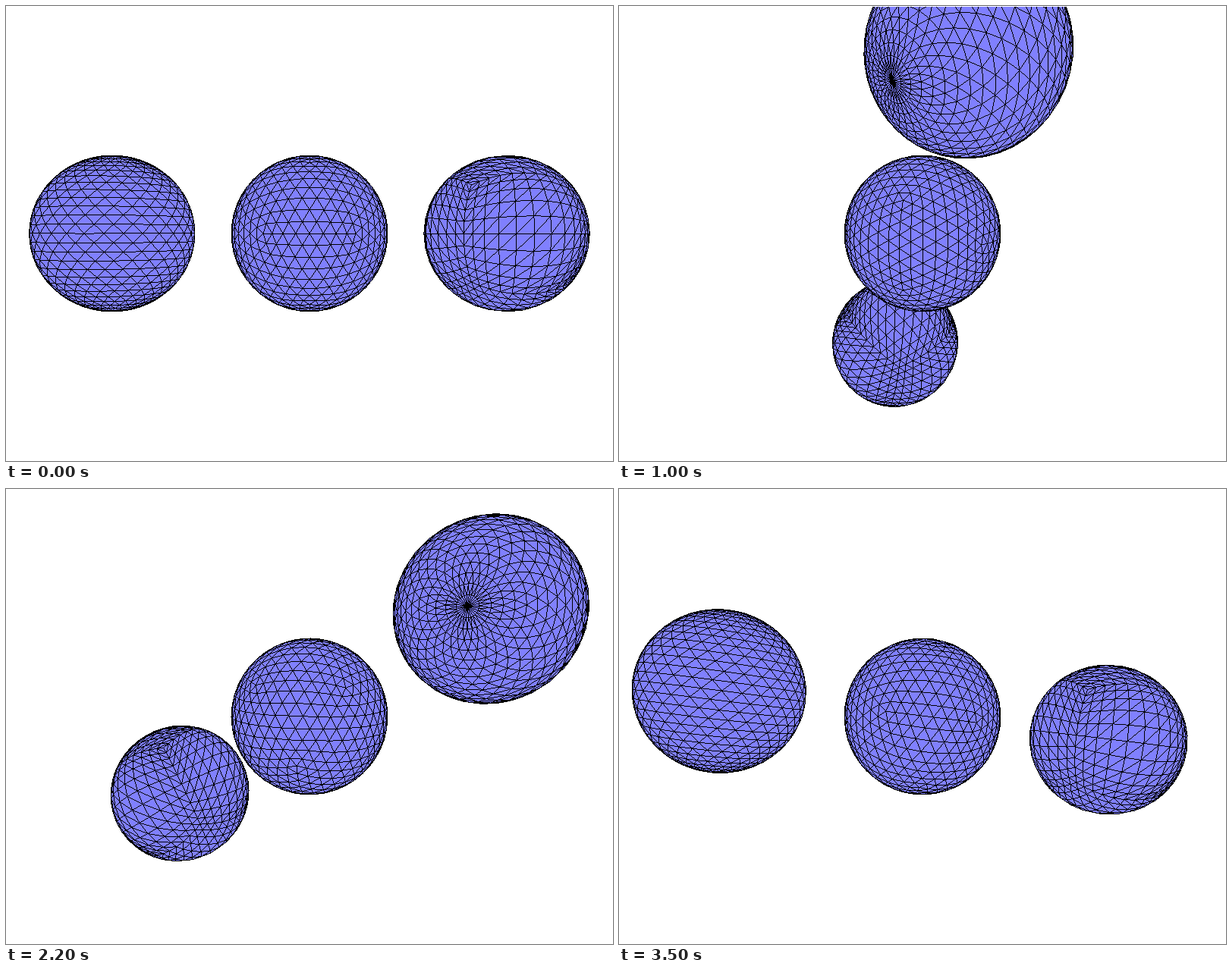
Write an HTML page with a canvas that moves like this. It is 800 by 600 pixels and loops after 3.6 s.

```html
<!DOCTYPE html>
<html lang="en">
<head>
<meta charset="utf-8">
<title>Three sphere meshes</title>
<style>
  html, body { margin: 0; width: 100%; height: 100%; overflow: hidden; background: #fff; }
  canvas { display: block; width: 800px; height: 600px; }
</style>
</head>
<body>
<canvas id="stage" width="800" height="600"></canvas>
<script>
const W = 800, H = 600;
const FOCAL = 300 / Math.tan(Math.PI / 8);
const DISTANCE = 7.1, SPACING = 2.5;
const STEP_MS = 100, STEPS = 36;
const RIM = -0.1; // edges of faces turned away this little still show
const WHITE = 0xffffffff, BLACK = 0xff000000, BLUE = 0xffff8080;

const ctx = document.getElementById('stage').getContext('2d');
const image = ctx.createImageData(W, H);
const pixels = new Uint32Array(image.data.buffer);

const sub = (a, b) => a.map((v, i) => v - b[i]);
const dot = (a, b) => a[0] * b[0] + a[1] * b[1] + a[2] * b[2];
const cross = (a, b) => [
  a[1] * b[2] - a[2] * b[1],
  a[2] * b[0] - a[0] * b[2],
  a[0] * b[1] - a[1] * b[0]
];
const unit = p => {
  const len = Math.hypot(...p);
  return p.map(v => v / len);
};

// Rings of equal latitude, every other one turned by half a segment
function ringSphere(rings, segments) {
  const tris = [];
  const at = (i, j) => {
    const lat = Math.PI * i / rings;
    const lon = 2 * Math.PI * (j + (i % 2) / 2) / segments;
    const r = Math.sin(lat);
    return [r * Math.cos(lon), Math.cos(lat), r * Math.sin(lon)];
  };
  for (let i = 0; i < rings; i++) {
    const odd = i % 2;
    for (let j = 0; j < segments; j++) {
      if (i > 0) tris.push([at(i, j), at(i, j + 1), at(i + 1, j + odd)]);
      if (i < rings - 1) tris.push([at(i + 1, j), at(i + 1, j + 1), at(i, j + 1 - odd)]);
    }
  }
  return tris;
}

// Flat triangular grid of n rows, pushed out to the sphere
function splitFace(a, b, c, n) {
  const tris = [];
  const at = (i, j) => unit(a.map((v, k) => v * (n - i - j) + b[k] * i + c[k] * j));
  for (let i = 0; i < n; i++) {
    for (let j = 0; j < n - i; j++) {
      tris.push([at(i, j), at(i + 1, j), at(i, j + 1)]);
      if (i + j < n - 1) tris.push([at(i + 1, j), at(i + 1, j + 1), at(i, j + 1)]);
    }
  }
  return tris;
}

function icoSphere(n) {
  const g = (1 + Math.sqrt(5)) / 2;
  const corners = [];
  for (const s of [-1, 1]) {
    for (const t of [-g, g]) corners.push([s, 0, t], [t, s, 0], [0, t, s]);
  }
  const near = (a, b) => Math.hypot(...sub(a, b)) < 2.1;
  const tris = [];
  for (let i = 0; i < 12; i++) {
    for (let j = 0; j < i; j++) {
      for (let k = 0; k < j; k++) {
        const [a, b, c] = [corners[i], corners[j], corners[k]];
        if (near(a, b) && near(b, c) && near(a, c)) tris.push(...splitFace(a, b, c, n));
      }
    }
  }
  return tris;
}

function cubeSphere(n) {
  const tris = [];
  for (let axis = 0; axis < 3; axis++) {
    for (const side of [-1, 1]) {
      const at = (i, j) => {
        const p = [0, 0, 0];
        p[axis] = side;
        p[(axis + 1) % 3] = 2 * i / n - 1;
        p[(axis + 2) % 3] = side * (2 * j / n - 1);
        return unit(p);
      };
      for (let i = 0; i < n; i++) {
        for (let j = 0; j < n; j++) {
          const a = at(i, j), c = at(i + 1, j + 1);
          tris.push([a, at(i + 1, j), c], [a, c, at(i, j + 1)]);
        }
      }
    }
  }
  return tris;
}

const outward = tris => tris.map(([a, b, c]) =>
  dot(cross(sub(b, a), sub(c, a)), a) < 0 ? [a, c, b] : [a, b, c]);

const spheres = [
  { x: -SPACING, tris: outward(ringSphere(30, 30)) },
  { x: 0, tris: outward(icoSphere(8)) },
  { x: SPACING, tris: outward(cubeSphere(10)) }
];

// Turn about the axis (0, 1, -1)
function turn([x, y, z], angle) {
  const h = Math.SQRT1_2, cos = Math.cos(angle), sin = Math.sin(angle);
  const b = (y + z) * h, c = (y - z) * h;
  const q = b * cos - x * sin;
  return [x * cos + b * sin, (q + c) * h, (q - c) * h];
}

function project([x, y, z]) {
  const k = FOCAL / (DISTANCE - z);
  return [W / 2 + x * k, H / 2 - y * k];
}

// Cosine between the face normal and the direction to the eye
function facing([a, b, c]) {
  const normal = unit(cross(sub(b, a), sub(c, a)));
  return dot(normal, unit(sub([0, 0, DISTANCE], a)));
}

// The top row of the stage stays blank
function plot(x, y, color) {
  if (x >= 0 && x < W && y >= 1 && y < H) pixels[y * W + x] = color;
}

function drawLine([x0, y0], [x1, y1]) {
  const dx = x1 - x0, dy = y1 - y0;
  const n = Math.max(1, Math.ceil(Math.max(Math.abs(dx), Math.abs(dy))));
  const steep = Math.abs(dy) > Math.abs(dx);
  const first = Math.floor(steep ? Math.min(y0, y1) : Math.min(x0, x1));
  for (let i = 0; i <= n; i++) {
    const major = first + i + 0.5;
    const t = steep ? (major - y0) / dy : (major - x0) / dx;
    if (!(t >= 0 && t <= 1)) continue;
    if (steep) plot(Math.floor(x0 + dx * t), first + i, BLACK);
    else plot(first + i, Math.floor(y0 + dy * t), BLACK);
  }
}

function fillTriangle(pts) {
  const ys = pts.map(p => p[1]);
  const top = Math.max(1, Math.ceil(Math.min(...ys) - 0.5));
  const bottom = Math.min(H - 1, Math.floor(Math.max(...ys) - 0.5));
  for (let y = top; y <= bottom; y++) {
    let left = W, right = 0;
    for (let i = 0; i < 3; i++) {
      const p = pts[i], q = pts[(i + 1) % 3];
      const t = (y + 0.5 - p[1]) / (q[1] - p[1]);
      if (!(t >= 0 && t <= 1)) continue;
      const x = p[0] + (q[0] - p[0]) * t;
      left = Math.min(left, x);
      right = Math.max(right, x);
    }
    for (let x = Math.ceil(left - 0.5); x <= right - 0.5; x++) plot(x, y, BLUE);
  }
}

function drawSphere(sphere, angle) {
  const edged = [];
  for (const tri of sphere.tris) {
    const placed = tri.map(p => turn([p[0] + sphere.x, p[1], p[2]], angle));
    const cos = facing(placed);
    if (cos < RIM) continue;
    const pts = placed.map(project);
    if (cos > 0) fillTriangle(pts);
    edged.push(pts);
  }
  for (const [a, b, c] of edged) {
    drawLine(a, b);
    drawLine(b, c);
    drawLine(c, a);
  }
}

function drawScene(step) {
  // Half a turn forward, then back again
  const angle = Math.min(step, STEPS - step) * Math.PI / 18;
  pixels.fill(WHITE);
  const depth = s => turn([s.x, 0, 0], angle)[2];
  [...spheres].sort((a, b) => depth(a) - depth(b)).forEach(s => drawSphere(s, angle));
  ctx.putImageData(image, 0, 0);
}

const start = performance.now();
let shown = -1;

function tick() {
  const step = Math.floor((performance.now() - start) / STEP_MS) % STEPS;
  if (step !== shown) {
    shown = step;
    drawScene(step);
  }
  requestAnimationFrame(tick);
}
tick();
</script>
</body>
</html>
```
